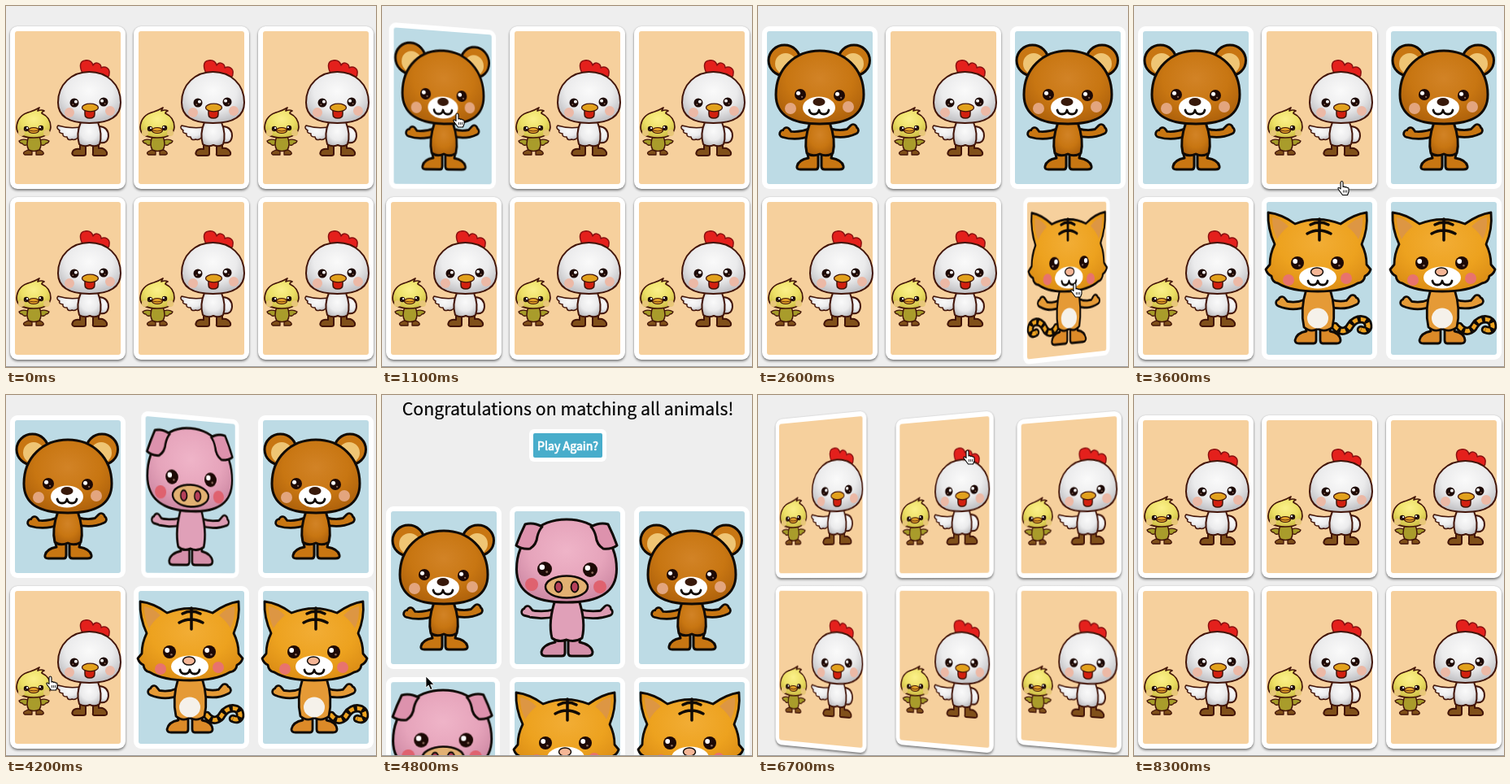
Animation, 455 px wide and 444 px high, one loop 8900 ms. Source, as an HTML page:

```html
<!DOCTYPE html>
<html lang="en">
<head>
<meta charset="utf-8">
<title>Animal matching game</title>
<style>
  html, body { margin: 0; width: 100%; height: 100%; overflow: hidden; background: #eee; }
  #stage { position: relative; width: 455px; height: 444px; overflow: hidden; background: #eee; }
  #board { position: absolute; left: 0; top: 0; width: 455px; height: 460px;
           perspective: 1400px; perspective-origin: 228px 230px; }
  .card { position: absolute; width: 142px; height: 200px; border-radius: 9px; background: #fff; }
  .card.closed { box-shadow: 0 2px 3px rgba(0, 0, 0, .45), 0 0 2px rgba(0, 0, 0, .18); }
  .card svg { display: block; }
  #over, #defs { position: absolute; left: 0; top: 0; }
  text { font-family: "Noto Sans CJK JP", "Noto Sans CJK SC", "Noto Sans CJK", "Noto Sans", sans-serif; }
</style>
</head>
<body>
<div id="stage">
  <svg id="defs" width="0" height="0"></svg>
  <div id="board"></div>
  <svg id="over" width="455" height="444">
    <rect y="443" width="455" height="1" fill="#9a9a9a"/>
    <g id="won" text-anchor="middle">
      <text x="228.5" y="25" font-size="21.3" fill="#000" stroke="#000" stroke-width=".2">Congratulations on matching all animals!</text>
      <rect x="181" y="42" width="95" height="40" rx="6" fill="#fff"/>
      <rect x="186" y="47" width="85" height="30" rx="2" fill="#48adcb"/>
      <text x="228.5" y="68" font-size="14.2" fill="#fff" stroke="#fff" stroke-width=".7">Play Again?</text>
    </g>
    <g id="pointer" stroke="#000" stroke-width="1.1" stroke-linejoin="round" fill="#fff">
      <g id="hand">
        <path d="M3 2Q3 0 4.500 0Q6 0 6 2V7Q8 6 8.500 7.500Q10.500 6.500 11 8.200Q13 7.500 13 9.500V13L11.500 17H5.500L1 11Q-1 8.500 .5 8Q1.800 7.800 3 9.500Z"/>
        <path d="M6.500 11V14M8.500 11V14M10.500 11V14" stroke-width=".8"/>
      </g>
      <path id="arrow" d="M0 0V14L3.200 11L5.600 16.500L8 15.500L5.700 10.200H10Z" fill="#000" stroke="#fff" stroke-width=".8"/>
    </g>
  </svg>
</div>
<script>
const $ = id => document.getElementById(id);
const LOOP = 8900, FLIP = 700, WIN = 4210, RESET = 6292, DROP = 112;

// ---- artwork ----
const oval = (x, y, rx, ry, fill, more = '') =>
  `<ellipse cx="${x}" cy="${y}" rx="${rx}" ry="${ry}" fill="${fill}" ${more}/>`;
const path = (d, fill, more = '') => `<path d="${d}" fill="${fill}" ${more}/>`;
const bare = 'stroke="none"';
const blob = (x, y, r, fill) => oval(x, y, r, r, fill, bare);
const eye = (x, y, r, side = -1) => blob(x, y, r, '#1d0905') +
  blob(x + side * r * .35, y - r * .25, r * .36, '#fff') + blob(x - side * r * .3, y + r * .4, r * .16, '#8a6a5a');
const glow = (id, a, b, c) => `<radialGradient id="${id}" cx=".5" cy=".38" r=".68">
  <stop offset="0" stop-color="${a}"/><stop offset=".55" stop-color="${b}"/><stop offset="1" stop-color="${c}"/></radialGradient>`;
const smile = (x, y) => path(`M${x - 12} ${y}q1 5 6 5t6-5q1 5 6 5t6-5`, 'none', 'stroke-width="2.800"');
const limb = (d, fill, width = 6) => path(d, 'none', `stroke-width="${width + 5.5}"`) +
  path(d, 'none', `stroke="${fill}" stroke-width="${width}"`);

// a round head, narrow on top and full at the cheeks
function head(x, top, rx, bottom, fill) {
  const h = bottom - top, cheek = top + h * .6;
  const half = s => `C${x + s * rx * .56} ${top} ${x + s * rx} ${top + h * .24} ${x + s * rx} ${cheek}` +
    `C${x + s * rx} ${top + h * .9} ${x + s * rx * .6} ${bottom} ${x} ${bottom}`;
  return path(`M${x} ${top}${half(1)}M${x} ${top}${half(-1)}`, fill);
}

const symbol = (id, ink, width, place, art) =>
  `<g id="${id}" transform="${place}" stroke="${ink}" stroke-width="${width}" stroke-linejoin="round" stroke-linecap="round">${art}</g>`;
const mirror = (x, y) => `translate(142 0) scale(-1 1) translate(${-x} ${-y})`;

const hen =
  path('M95 84C90 76 90 68 97 67C103 66 106 69 107 73C110 68 117 70 117 76C122 73 128 77 127 83Q127 89 121 88Z', '#e4201c', 'stroke="#8a1010" stroke-width="1.500"') +
  path('M115 148Q126 149 126 160Q125 170 115 168Z', 'url(#white)') +
  path('M91 149Q77 151 64 147Q61 150 66 153Q64 156 70 157Q69 161 75 161Q76 166 81 164Q87 166 91 158Z', 'url(#white)', 'stroke-width="1.500"') +
  path('M91 171H98V182Q98 184 95 184H84Q80 183 82 179Q84 175 91 176Z', '#80501a') +
  path('M107 171H114V175Q121 174 124 180Q125 184 121 184H109Q106 184 107 181Z', '#80501a') +
  path('M92 143H113Q119 158 115 170Q110 174 103 171Q96 174 90 170Q86 157 92 143Z', 'url(#white)') +
  head(102.5, 81, 38.5, 144, 'url(#white)') +
  blob(78, 131, 6, '#ecb9a6') + blob(128, 129, 6, '#ecb9a6') +
  eye(84, 119, 5.5, 1) + eye(120, 118, 5.5) +
  path('M97 127H109V133Q109 138 103 138Q97 138 97 133Z', '#d3200f', 'stroke-width="1.500"') +
  oval(103.5, 125, 10, 4.8, '#e2a11d', 'stroke-width="1.300"');

const chick =
  path('M27 165Q20 163 16 166Q17 169 20 169Q22 173 28 170Z', '#a59b28', 'stroke-width="1.300"') +
  path('M42 165Q48 163 53 166Q52 169 49 169Q47 173 41 170Z', '#a59b28', 'stroke-width="1.300"') +
  path('M27 177H32V183H23Q20 181 23 179Z', '#80501a', 'stroke-width="1.300"') +
  path('M37 177H42L45 179Q48 182 44 183H37Z', '#80501a', 'stroke-width="1.300"') +
  path('M28 160H41Q45 171 41 177Q34 180 28 177Q24 171 28 160Z', '#a99c2b', 'stroke-width="1.500"') +
  path('M30 130Q36 128 41 125Q39 128 39 129Q44 127 47 129Q44 130 44 132Q55 137 55 149Q54 162 34 162Q13 162 13 149Q14 134 30 130Z', 'url(#yellow)', 'stroke-width="1.700"') +
  blob(19, 156, 4, '#e8c778') + blob(50, 156, 4, '#e8c778') +
  eye(25, 151, 3.2, 1) + eye(43, 150, 3.2) +
  oval(34, 153, 6.5, 3.5, '#e2a127', 'stroke-width="1.200"') +
  path('M28 153Q34 155 40 153', 'none', 'stroke-width=".8"');

const bear =
  oval(32.5, 67, 19.5, 19, '#c87612') + oval(118, 67, 19.5, 19, '#c87612') +
  blob(34, 71, 13, '#efc574') + blob(117, 71, 13, '#efc574') +
  limb('M64 155Q48 162 31 157M38 158L35 154', '#c87612') +
  limb('M88 155Q104 160 119 153M112 155L117 150', '#c87612') +
  path('M60 178L62 187Q50 189 48 197Q47 201 52 201H71Q74 201 74 197V183Z', '#c87612') +
  path('M92 178L90 187Q103 189 105 197Q106 201 100 201H82Q78 201 78 197V183Z', '#c87612') +
  path('M64 143H88Q96 165 92 181Q84 186 76 182Q67 186 60 181Q56 165 64 143Z', 'url(#brown)') +
  head(76, 55, 54, 145, 'url(#brown)') +
  blob(40, 126, 7, '#e3a57e') + blob(111, 124, 7, '#e3a57e') +
  oval(75, 125, 20, 13.5, '#fff', bare) +
  eye(52, 109, 7) + eye(100, 110, 7) +
  oval(75, 118, 7.5, 5, '#38190a', bare) + smile(75, 128);

const bandTail = 'M247 394C255 404 263 399 266 393C273 382 289 383 288 395Q286 401 279 398';
const tiger =
  limb(bandTail, '#eda21f', 5) +
  path(bandTail, 'none', 'stroke-width="6" stroke-linecap="butt" stroke-dasharray="4 6" stroke-dashoffset="-5"') +
  limb('M212 365Q196 372 179 365M186 367L182 362', '#e59a36') +
  limb('M241 365Q256 371 272 363M264 366L269 360', '#e59a36') +
  path('M210 391L212 400Q200 402 198 411Q198 415 203 415H221Q224 415 224 411V396Z', '#dc8a28') +
  path('M243 391L241 400Q253 402 254 411Q254 415 249 415H232Q229 415 229 411V396Z', '#dc8a28') +
  path('M212 348H241Q249 373 244 395Q235 402 226 397Q217 402 209 395Q204 373 212 348Z', '#e59a36') +
  oval(226, 384, 13, 12.5, '#f5f1ea', bare) +
  path('M165 254Q182 256 198 268Q226 257 254 268Q271 256 286 254Q288 274 280 293Q286 305 286 318L291 324Q289 330 284 332Q283 340 275 341Q258 351 226 351Q193 351 177 341Q170 340 169 332Q164 330 162 324L167 318Q167 305 173 293Q164 274 165 254Z', 'url(#orange)') +
  path('M170 260Q181 262 190 271Q181 278 176 287Q170 274 170 260ZM281 260Q271 262 262 271Q271 278 276 287Q282 274 281 260Z', '#dd9643', bare) +
  path('M228 262V288M217 269Q228 263 239 269M213 280Q227 272 242 280', 'none', 'stroke-width="3.500"') +
  blob(190, 337, 7, '#e8736d') + blob(261, 335, 7, '#e8736d') +
  oval(226, 334, 23, 13.5, '#fff', bare) +
  eye(201, 316, 8) + eye(250, 316, 8) +
  oval(225, 327, 7.5, 5, '#f5b696', 'stroke-width="1.500"') + smile(226, 338);

const pig =
  limb('M213 268Q194 273 176 267M183 269L179 264', '#dc9bb2') +
  limb('M242 268Q262 273 279 267M271 269L277 263', '#dc9bb2') +
  path('M211 294L213 304Q198 307 196 316Q196 321 201 321H221Q225 321 225 317V300Z', '#d590aa') +
  path('M245 294L243 304Q257 307 259 316Q259 321 253 321H233Q229 321 229 317V300Z', '#d590aa') +
  path('M213 252H242Q251 279 246 299Q236 305 227 301Q217 305 209 299Q204 279 213 252Z', '#e0a0b8') +
  head(227, 153, 61.5, 255, 'url(#pink)') +
  path('M197 162Q186 156 176 159Q170 171 165 185Q172 190 182 189Q190 184 191 174Q193 166 197 162Z', '#dd92ad') +
  path('M257 162Q268 156 278 159Q284 171 289 185Q282 190 272 189Q264 184 263 174Q261 166 257 162Z', '#dd92ad') +
  blob(184, 233, 8, '#df626f') + blob(268, 236, 8, '#df626f') +
  eye(200, 214, 9) + eye(256, 215, 9) +
  oval(227, 236, 26, 13.5, '#e2b172', 'stroke-width="2.500"') +
  oval(217, 236, 4.5, 6.5, '#b5405a', 'stroke-width="1.800"') + oval(237, 236, 4.5, 6.5, '#b5405a', 'stroke-width="1.800"');

$('defs').innerHTML = '<defs>' +
  glow('white', '#fafafa', '#ebebec', '#b4b4b8') + glow('yellow', '#fbf08a', '#ecdf65', '#c5b33e') +
  glow('brown', '#d28326', '#c87612', '#a95d0a') + glow('orange', '#f2ad35', '#eda21f', '#d98a14') +
  glow('pink', '#efb4c8', '#e6a4bb', '#c9839f') +
  symbol('back', '#421408', 2, 'translate(-5 -25)', hen + chick) +
  symbol('bear', '#100a06', 3, mirror(5, 25), bear) +
  symbol('tiger', '#100a06', 2.8, mirror(157, 235), tiger) +
  symbol('pig', '#100a06', 3, mirror(157, 137), pig) + '</defs>';

// ---- cards: animal and the time it is clicked ----
const cards = [['bear', 760], ['pig', 3800], ['bear', 1510], ['pig', WIN], ['tiger', 2880], ['tiger', 2573]]
  .map(([animal, start], i) => {
    const x = [5, 157, 310][i % 3], y = i < 3 ? 25 : 235;
    const el = document.createElement('div');
    el.style.left = x + 'px';
    el.style.top = y + 'px';
    el.innerHTML = '<svg width="142" height="200"><rect x="6" y="6" width="130" height="188" rx="3"/><use href="#back"/></svg>';
    $('board').append(el);
    return { animal, start, x, y, el, paper: el.querySelector('rect'), art: el.querySelector('use') };
  });

// ---- motion ----
const bez = (u, a, b) => 3 * u * (1 - u) ** 2 * a + 3 * u * u * (1 - u) * b + u ** 3;
function overshoot(p) {
  if (p <= 0) return 0;
  if (p >= 1) return 1;
  let lo = 0, hi = 1;
  for (let i = 0; i < 24; i++) {
    const mid = (lo + hi) / 2;
    if (bez(mid, .175, .32) < p) lo = mid; else hi = mid;
  }
  return bez(lo, .885, 1.5);
}

// pointer stops: time, x, y
const stops = [
  [100, 470, 430], [500, 92, 132], [1100, 92, 132], [1480, 371, 134], [2000, 371, 134],
  [2500, 389, 341], [2620, 389, 341], [2860, 248, 282], [3400, 248, 282], [3800, 262, 150],
  [3900, 262, 150], [4190, 54, 346], [5100, 54, 346], [5400, 276, 95], [5550, 276, 95],
  [5900, 257, 68], [6950, 257, 68], [7400, 470, 430]
];
function pointerAt(t) {
  const i = stops.findIndex(s => s[0] > t);
  if (i <= 0) return stops[0].slice(1);
  const [t0, x0, y0] = stops[i - 1], [t1, x1, y1] = stops[i];
  const p = (t - t0) / (t1 - t0), e = p * p * (3 - 2 * p);
  return [x0 + (x1 - x0) * e, y0 + (y1 - y0) * e];
}

function draw(t) {
  const won = t >= WIN && t < RESET;
  const drop = won ? DROP : 0;
  $('won').style.display = won ? '' : 'none';
  $('board').style.top = drop + 'px';

  for (const c of cards) {
    const open = t >= c.start && t < RESET;
    const turn = t < RESET ? overshoot((t - c.start) / FLIP) : 1 - overshoot((t - RESET) / FLIP);
    c.el.className = open ? 'card' : 'card closed';
    c.el.style.transform = turn ? `rotateY(${turn * 180}deg)` : 'none';
    c.paper.setAttribute('fill', open && turn > .5 ? '#bddbe5' : '#f6d09d');
    const href = '#' + (open ? c.animal : 'back');
    if (c.art.getAttribute('href') !== href) c.art.setAttribute('href', href);
  }

  const [x, y] = pointerAt(t);
  const within = (l, top, w, h) => x >= l && x < l + w && y >= top && y < top + h;
  const active = cards.some(c => within(c.x, c.y + drop, 142, 200)) || won && within(181, 42, 95, 40);
  $('hand').style.display = active ? '' : 'none';
  $('arrow').style.display = active ? 'none' : '';
  $('pointer').setAttribute('transform', `translate(${active ? x - 4 : x} ${y})`);
}

const born = performance.now();
function tick() {
  draw((performance.now() - born) % LOOP);
  requestAnimationFrame(tick);
}
tick();
</script>
</body>
</html>
```
